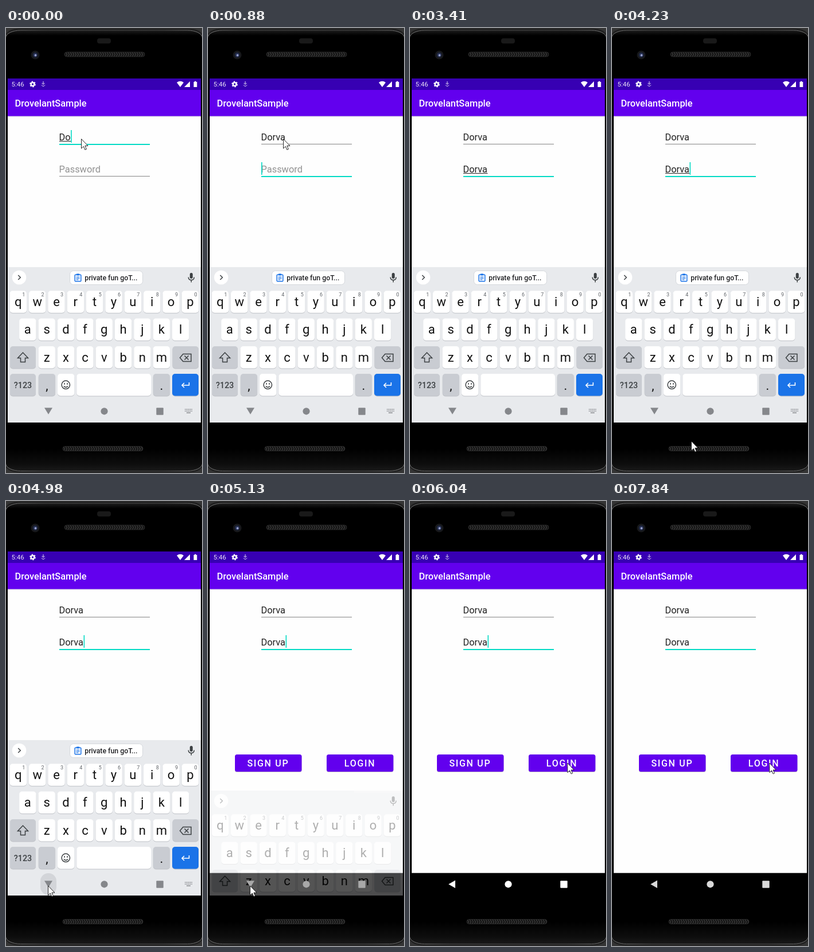
An HTML page that plays this animation: 342 by 776 pixels, repeating every 7990 ms.

```html
<!DOCTYPE html>
<html lang="en">
<head>
<meta charset="utf-8">
<title>Login form on a phone</title>
<style>
  html, body { margin: 0; width: 100%; height: 100%; overflow: hidden; background: #000; }
  svg { display: block; width: 342px; height: 776px; font-family: Roboto, sans-serif; }
  .mid { text-anchor: middle; }
  .line { fill: none; stroke: #3c4043; stroke-width: 1.5; }
</style>
</head>
<body>
<svg viewBox="0 0 342 776">
  <defs>
    <linearGradient id="body" x2="0" y2="1">
      <stop offset="0" stop-color="#1c1c1c"/><stop offset=".012" stop-color="#000"/>
      <stop offset=".95" stop-color="#000"/><stop offset=".985" stop-color="#0e0e0e"/>
      <stop offset="1" stop-color="#1a1a1a"/>
    </linearGradient>
    <linearGradient id="rim">
      <stop offset="0" stop-color="#777"/><stop offset=".2" stop-color="#484848"/>
      <stop offset=".8" stop-color="#484848"/><stop offset="1" stop-color="#777"/>
    </linearGradient>
    <pattern id="mesh" width="4" height="8" patternUnits="userSpaceOnUse" y="2">
      <rect width="4" height="8" fill="#151515"/>
      <path d="M0 0L2.5 4L0 8" fill="none" stroke="#484848"/>
    </pattern>
    <clipPath id="screen"><rect x="3" y="88" width="337" height="600"/></clipPath>
  </defs>

  <rect width="342" height="776" fill="#343434"/>
  <rect x="-.5" y="1" width="343" height="774" rx="24" ry="12" fill="#1d1d1d" stroke="#2a2a2a"/>
  <rect x="-.5" y="4" width="343" height="768.5" rx="26" ry="13" fill="url(#body)" stroke="url(#rim)"/>
  <rect x="159" y="18" width="24" height="9" rx="4" fill="#191919"/>
  <circle cx="51" cy="47" r="7.5" fill="#17181b"/>
  <circle cx="51" cy="47" r="4.2" fill="#222c4c"/>
  <circle cx="51.5" cy="47.5" r="1.9" fill="#98a0cc"/>
  <rect x="102" y="42" width="140" height="8" rx="4" fill="url(#mesh)" stroke="#292929"/>
  <rect x="99" y="729.5" width="140" height="8" rx="4" fill="url(#mesh)" stroke="#292929"/>

  <g clip-path="url(#screen)">
    <rect x="3" y="88" width="337" height="600"/>
    <rect x="3" y="88" width="337" height="560.7" fill="#fefefe"/>
    <rect x="3" y="153" width="337" height="1.6" fill="#d5d0de"/>
    <rect x="3" y="108" width="337" height="45.6" fill="#6200ee"/>
    <rect x="3" y="88" width="337" height="20" fill="#3700b3"/>
    <g fill="#fff">
      <text x="9.5" y="102" font-size="11.5" fill="#e8e2f5">5:46</text>
      <circle cx="46.5" cy="98" r="2.9" fill="none" stroke="#fff" stroke-width="2.4"/>
      <circle cx="46.5" cy="98" r="4.6" fill="none" stroke="#fff" stroke-width="1.6" stroke-dasharray="2.4 2.42"/>
      <path d="M65 93v5M62.5 96l2.5 2.5l2.5-2.5M62 99.5q3 4 6 0" fill="none" stroke="#e8e2f5"/>
      <path d="M298 95q6-4.5 12 0l-6 8zM321 93v10h-10z"/>
      <path d="M327.5 94h1.5v-1.3h2.5V94h1.8v9h-5.8z"/>
      <text x="15.5" y="137" font-size="16.4" font-weight="500">DrovelantSample</text>
    </g>
    <g id="fields"></g>
    <g id="buttons"></g>
    <g id="keyboard"></g>
    <rect id="ripple" x="60" y="649" width="28" height="38" rx="14" fill="#d3d5d9"/>
    <g id="nav">
      <path id="back"/>
      <circle cx="171.5" cy="668.3" r="6.1"/>
      <rect x="262.3" y="662.3" width="12.4" height="12.4" rx="1"/>
    </g>
    <g id="hideIcon" fill="#a0a2a6">
      <path d="M312 664h13v2h-13zM312 667h13v2h-13zM315 670h7v2h-7z"/>
      <path d="M314 664v5M317 664v5M320 664v5M323 664v5" stroke="#e8eaed"/>
    </g>
  </g>
  <path id="pointer" d="M.5.5V17L4.3 13.5L6.8 19.3L9.4 18.2L6.9 12.5H12Z" fill="#fff" stroke="#111" stroke-width=".9"/>
</svg>

<script>
const LOOP = 7990, NAME = 'Dorva', LEFT = 93, TEAL = '#03dac5';
const $ = id => document.getElementById(id);
const pen = document.createElement('canvas').getContext('2d');
pen.font = '16.4px Roboto, sans-serif';
const widthOf = n => pen.measureText(NAME.slice(0, n)).width;

// Input fields
const fields = [190, 246].map(y => {
  const g = document.createElementNS('http://www.w3.org/2000/svg', 'g');
  g.innerHTML = `<text x="92.5" y="${y + 6}" font-size="16.4"></text>
    <rect x="${LEFT}" y="${y + 7}" height="1" fill="#222"/>
    <rect x="${LEFT}" y="${y + 12}" width="158"/>
    <rect y="${y - 12}" width="1.6" height="22" fill="${TEAL}"/>`;
  $('fields').append(g);
  const [text, compose, base, caret] = g.children;
  return { text, compose, base, caret };
});

function showField({ text, compose, base, caret }, typed, underlined, focused, caretOn, hint) {
  text.textContent = typed ? NAME.slice(0, typed) : hint;
  text.setAttribute('fill', typed ? '#212121' : '#929292');
  compose.setAttribute('width', underlined ? widthOf(underlined) : 0);
  base.setAttribute('height', focused ? 2 : 1);
  base.setAttribute('fill', focused ? TEAL : '#858585');
  caret.setAttribute('x', LEFT + widthOf(typed));
  caret.setAttribute('visibility', focused && caretOn ? 'visible' : 'hidden');
}

// Buttons
$('buttons').innerHTML = [[47, 68.4, 'SIGN UP'], [207, 237.8, 'LOGIN']].map(([x, tx, label]) =>
  `<rect x="${x}" y="443" width="116.5" height="30" rx="3.5" fill="#000" opacity=".2"/>
   <rect x="${x}" y="442" width="116.5" height="30" rx="3.5" fill="#6200ee"/>
   <text x="${tx}" y="463" font-size="16" font-weight="500" letter-spacing="1.7" fill="#fff">${label}</text>`).join('');

// Keyboard
const GREY = '#c9ccd2';
const key = (x, y, w, fill = '#fff') =>
  `<rect x="${x}" y="${y + 1}" width="${w}" height="38.5" rx="5" fill="#bfc2c7"/>
   <rect x="${x}" y="${y}" width="${w}" height="38.5" rx="5" fill="${fill}"/>`;
const letter = (c, x, y) => `<text class="mid" x="${x}" y="${y}" font-size="22" fill="#111">${c}</text>`;
const row = (chars, x0, y, digits) => [...chars].map((c, i) => {
  const x = x0 + i * 33.35;
  const digit = digits
    ? `<text class="mid" x="${x + 9.5}" y="467.5" font-size="9" fill="#5f6368">${(i + 1) % 10}</text>` : '';
  return key(x - 14.7, y, 29.4) + letter(c, x, y + 26.7) + digit;
}).join('');

$('keyboard').innerHTML = `
  <rect x="3" y="417" width="337" height="271" fill="#e8eaed"/>
  <circle cx="23" cy="435" r="12.3" fill="#fff"/>
  <path class="line" d="M21.2 431l4 4l-4 4"/>
  <g id="chip">
    <rect x="111.5" y="423.5" width="127" height="24" rx="6" fill="#fff" stroke="#d5d8dc"/>
    <rect x="120.2" y="430.2" width="10.6" height="11.6" rx="1" fill="none" stroke="#1a73e8" stroke-width="1.5"/>
    <path d="M123 428.5h5v3h-5zM122.5 433.4h6v1.2h-6zM122.5 435.8h6v1.2h-6zM122.5 438.2h4v1.2h-4z" fill="#1a73e8"/>
    <text x="137.3" y="440" font-size="12.3" font-weight="500" fill="#202124">private fun goT...</text>
  </g>
  <rect x="320.8" y="427" width="5" height="10" rx="2.5" fill="#3c4043"/>
  <path class="line" d="M318.3 434.5q0 5 5 5t5-5M323.3 439.5v4"/>
  ${row('qwertyuiop', 21.3, 458.3, true)}${row('asdfghjkl', 37.8, 506.5)}${row('zxcvbnm', 71.2, 555)}
  ${key(7, 555, 45, GREY)}${key(290.5, 555, 45.5, GREY)}
  <path class="line" d="M29.5 566l-9 9.5h5v7h8v-7h5z"/>
  <path class="line" d="M309 568.5h14v13h-14l-5.5-6.5zM311.5 571.5l7 7M318.5 571.5l-7 7"/>
  ${key(7, 603, 45, GREY)}${key(56.7, 603, 29.4, GREY)}${key(90, 603, 29.4)}
  ${key(123.3, 603, 129.7)}${key(256.7, 603, 29.4, GREY)}${key(290, 603, 46, '#1a73e8')}
  <text class="mid" x="29.5" y="628" font-size="14.3" font-weight="500" fill="#3c4043">?123</text>
  ${letter(',', 71.5, 631)}${letter('.', 271.5, 631)}
  <circle class="line" cx="104.3" cy="622.3" r="7.2"/>
  <path d="M101 619.5h2v2h-2zM106 619.5h2v2h-2z" fill="#3c4043"/>
  <path class="line" d="M100.8 624.5q3.6 4 7.2 0"/>
  <path d="M319.5 618v5h-12M311 619l-4 4l4 4" fill="none" stroke="#fff" stroke-width="1.6"/>`;

// Timelines: [start ms, value], each held until the next
const typedA = [[0, 2], [150, 3], [300, 4], [450, 5]];
const composeA = [[0, 2], [150, 3], [300, 4], [730, 5], [880, 0]];
const typedB = [[0, 0], [1810, 1], [2090, 2], [2370, 3], [2620, 4], [2740, 5]];
const composeB = [[0, 0], [1810, 1], [2370, 3], [2620, 4], [2890, 5], [4980, 0]];
const caretFlips = [1410, 1810, 3290, 3840, 4350, 4860, 5490, 6040, 6470, 7000, 7450];
const pointerPath = [
  [0, [131, 193]], [3410, null], [3960, [324, 668]], [4080, [157, 668]],
  [4230, [138, 720]], [4350, [122, 716]], [4470, [113, 711]], [4590, [108, 706]],
  [4740, [88, 688]], [4860, [76, 675]], [4980, [73, 670.5]],
  [5370, [130, 610]], [5490, [215, 520]], [5610, [269, 464]], [5760, [274.3, 456.5]]
];
const navLook = [[0, '#85878b'], [5130, '#a8a8a8'], [5250, '#fff'], [7690, '#ebebeb'], [7840, '#d9d9d9']];
const at = (track, t) => track.findLast(([start]) => start <= t)[1];
const show = (id, on) => $(id).setAttribute('visibility', on ? 'visible' : 'hidden');

function draw(t) {
  const caretOn = caretFlips.filter(f => f <= t).length % 2 === 0;
  showField(fields[0], at(typedA, t), at(composeA, t), t < 880, caretOn, '');
  showField(fields[1], at(typedB, t), at(composeB, t), t >= 880, caretOn, 'Password');

  const closing = t >= 5130, closed = t >= 5250;
  show('keyboard', !closed);
  show('chip', !closing);
  show('hideIcon', !closing);
  show('buttons', closing);
  show('ripple', t >= 4980 && !closing);
  $('keyboard').setAttribute('transform', `translate(0 ${closing ? 88 : 0})`);
  $('keyboard').setAttribute('opacity', closing ? 0.33 : 1);
  $('nav').setAttribute('fill', at(navLook, t));
  $('back').setAttribute('d', closed ? 'M67.2 668.3L79 661.5V675Z' : 'M67 662.3H81L74 673.8Z');

  const spot = at(pointerPath, t);
  show('pointer', spot);
  if (spot) $('pointer').setAttribute('transform', `translate(${spot})`);
}

function tick() {
  draw(performance.now() % LOOP);
  requestAnimationFrame(tick);
}
tick();
</script>
</body>
</html>
```
